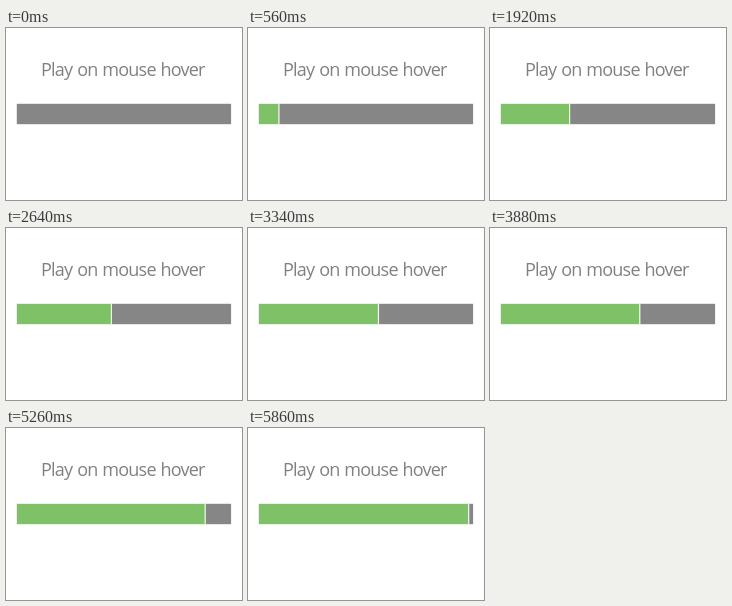
Recreate the animation shown at these times as an HTML page with a canvas. Size 236 px wide and 172 px high, loop 5880 ms.

```html
<!DOCTYPE html>
<html lang="en">
<head>
<meta charset="utf-8">
<title>Play on mouse hover</title>
<style>
  html, body { margin: 0; width: 100%; height: 100%; overflow: hidden; background: #fff; }
  canvas { display: block; width: 236px; height: 172px; }
</style>
</head>
<body>
<canvas id="stage" width="236" height="172"></canvas>
<script>
const ctx = document.getElementById('stage').getContext('2d');
const LOOP = 5880, STEP = 20;
const BAR = { left: 10.8, right: 225.1, top: 75.8, height: 20.4 };
const SPEED = 0.0358; // px per ms

function fillBar(from, to, color) {
  const left = Math.max(from, BAR.left);
  const right = Math.min(to, BAR.right);
  if (right <= left) return;
  ctx.fillStyle = color;
  ctx.fillRect(left, BAR.top, right - left, BAR.height);
}

function drawLabel() {
  ctx.font = '18px "Open Sans", "Noto Sans", sans-serif';
  ctx.letterSpacing = '-0.8px';
  ctx.wordSpacing = '1px';
  ctx.fillStyle = '#808080';
  ctx.fillText('Play on mouse hover', 35, 48);
}

function draw(t) {
  ctx.fillStyle = '#fff';
  ctx.fillRect(0, 0, 236, 172);
  drawLabel();
  const head = 10.7 + SPEED * t;
  if (t === 0) {
    fillBar(BAR.left, BAR.right, '#868686');
    return;
  }
  fillBar(head, BAR.right, '#868686');
  fillBar(BAR.left, head, '#7fc167');
  fillBar(head - 0.4, head + 0.8, '#f4f6f2');
}

const start = performance.now();
function tick() {
  const t = (performance.now() - start) % LOOP;
  draw(Math.floor(t / STEP) * STEP);
  requestAnimationFrame(tick);
}
tick();
</script>
</body>
</html>
```
